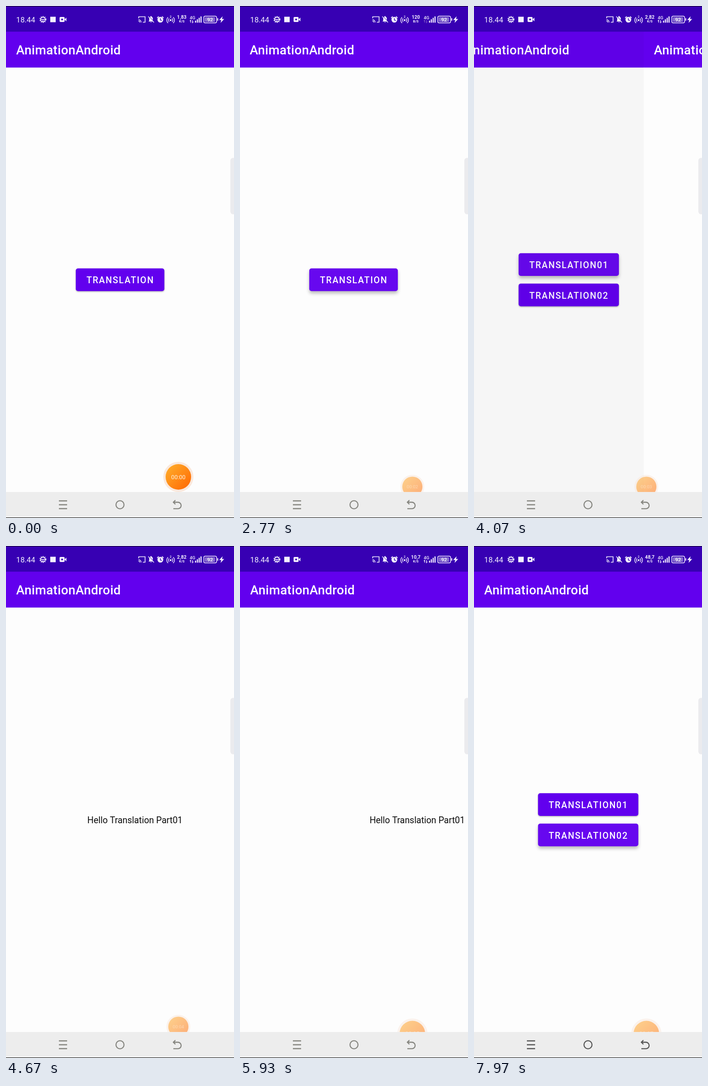
Animation, 500 px wide and 1121 px high, one loop 8 s. Source, as an HTML page with a canvas:

```html
<!DOCTYPE html>
<html lang="en">
<head>
<meta charset="utf-8">
<title>Translation demo</title>
<style>
  html, body { margin: 0; width: 100%; height: 100%; overflow: hidden; background: #000; }
  canvas { display: block; width: 500px; height: 1121px; }
</style>
</head>
<body>
<canvas id="stage" width="500" height="1121"></canvas>
<script>
const ctx = document.getElementById('stage').getContext('2d');
const LOOP = 8000, WIDTH = 500, NAV_TOP = 1064;
const ICON = '#f4f0ff', PRIMARY = '#6200ee', PRIMARY_DARK = '#3700b3';

const progress = (t, from, to) => Math.min(1, Math.max(0, (t - from) / (to - from)));
const mix = (a, b, k) => a + (b - a) * k;
const smooth = k => (1 - Math.cos(Math.PI * k)) / 2;
const slide = (t, end) => 1 - Math.pow(1 - progress(t, end - 500, end), 3.45);

function rect(x, y, w, h, color, radius = 0) {
  ctx.fillStyle = color;
  ctx.beginPath();
  ctx.roundRect(x, y, w, h, radius);
  ctx.fill();
}

function disc(x, y, r, color) {
  ctx.fillStyle = color;
  ctx.beginPath();
  ctx.arc(x, y, r, 0, 7);
  ctx.fill();
}

function arc(x, y, r, width, color = ICON, from = 0, to = Math.PI * 2) {
  ctx.strokeStyle = color;
  ctx.lineWidth = width;
  ctx.beginPath();
  ctx.arc(x, y, r, from, to);
  ctx.stroke();
}

function text(str, x, y, size, color, weight = 400, align = 'left', spacing = 0) {
  ctx.font = `${weight} ${size}px Roboto, sans-serif`;
  ctx.letterSpacing = spacing + 'px';
  ctx.textAlign = align;
  ctx.fillStyle = color;
  ctx.fillText(str, x, y);
}

function stroke(d, width, color = ICON) {
  ctx.strokeStyle = color;
  ctx.lineWidth = width;
  ctx.stroke(new Path2D(d));
}

function fill(d, color = ICON) {
  ctx.fillStyle = color;
  ctx.fill(new Path2D(d));
}

function button(label, x, y, w, press) {
  ctx.save();
  ctx.shadowColor = `rgba(40,40,40,${mix(0.35, 0.3, press)})`;
  ctx.shadowBlur = mix(3, 7, press);
  ctx.shadowOffsetY = mix(1.5, 5, press);
  rect(x, y, w, 49.7, PRIMARY, 5);
  ctx.restore();
  if (press) rect(x, y, w, 49.7, `rgba(255,255,255,${0.03 * press})`, 5);
  text(label, x + 23.4, y + 32.8, 19.44, '#fff', 500, 'left', 1.736);
}

const screens = [
  t => button('TRANSLATION', 153, 574.5, 194.3, progress(t, 2470, 2700)),
  t => {
    const first = progress(t, 3730, 3930) * (t < 5000);
    button('TRANSLATION01', 140.4, 541.3, 220, first);
    button('TRANSLATION02', 140.4, 607.8, 220, progress(t, 7730, 7970));
  },
  t => {
    const shift = 138.9 * smooth(progress(t, 4060, 5945));
    text('Hello Translation Part01', 145.3 + shift, 607, 19.44, '#0c0c0c');
  }
];

function drawScreen(index, x, t, shade = 0) {
  ctx.save();
  ctx.translate(x, 0);
  rect(0, 134, WIDTH, 987, '#fdfdfd');
  rect(0, 56, WIDTH, 78.7, PRIMARY);
  text('AnimationAndroid', 22.3, 106.3, 27.78, '#fff', 500, 'left', 0.347);
  screens[index](t);
  if (shade) rect(0, 56, WIDTH, 1065, `rgba(0,0,0,${shade})`);
  ctx.restore();
}

// The upper screen covers the lower one, which trails at a third of the speed.
function drawPair(lower, upper, cover, t) {
  if (cover < 1) drawScreen(lower, -WIDTH * cover / 3, t, 0.1 * cover);
  if (cover > 0) drawScreen(upper, WIDTH * (1 - cover), t);
}

function drawTimer(t) {
  const shrink = smooth(progress(t, 1800, 2350));
  const tuck = smooth(progress(t, 5430, 5850));
  const scale = mix(mix(1, 0.79, shrink), 1, tuck);
  ctx.save();
  ctx.translate(378, mix(mix(1031, 1052.5, shrink), 1067.5, tuck));
  ctx.scale(scale, scale);
  ctx.globalAlpha = mix(1, 0.5, shrink);
  disc(0, 0, 33, '#fae8dc');
  const glow = ctx.createLinearGradient(-20, -20, 20, 20);
  glow.addColorStop(0, '#ffa626');
  glow.addColorStop(1, '#ff7008');
  disc(0, 0, 28, glow);
  const seconds = Math.max(0, Math.floor((t - 120) / 1000));
  text('00:0' + seconds, 0, 4.6, 12.6, '#fff4e4', 400, 'center');
  ctx.restore();
}

function drawNav(t) {
  rect(0, NAV_TOP, WIDTH, 56, '#ededed');
  const ripple = progress(t, 6870, 7000) * (1 - progress(t, 7270, 7570));
  if (ripple) rect(300, NAV_TOP, 150, 55, `rgba(0,0,0,${0.07 * ripple})`, 27);
  const color = t < 6870 ? '#85857f' : '#555555';
  stroke('M116 1083.5H134M116 1092H134M116 1100.5H134', 2.3, color);
  arc(250, 1092, 8.8, 2.3, color);
  stroke('M371.5 1082L367 1086.5L371.5 1091M367 1086.5H377A7.1 7.1 0 0 1 377 1100.7H367', 2.3, color);
}

function drawStatus(t) {
  rect(0, 0, WIDTH, 56.3, PRIMARY_DARK);
  rect(0, 0, WIDTH, 1, '#080014');

  text('18.44', 22.3, 35.6, 16.6, ICON);
  arc(81, 29.5, 5, 1.8);
  ctx.setLineDash([2, 2.4]);
  arc(81, 29.5, 6.7, 1.8);
  ctx.setLineDash([]);
  stroke('M76 29.5H86M81 29.5V34', 1.4);
  rect(97, 23.5, 12, 12, ICON);
  rect(117.5, 24, 11, 11, ICON, 2);
  fill('M128 29.5L132.5 25.5V33.5Z');
  disc(123, 29.5, 2, PRIMARY_DARK);

  // cast, muted bell, alarm clock
  stroke('M291 27V23.5H305V35.5H300', 1.6);
  stroke('M290.5 30A6 6 0 0 1 296.5 36M290.5 33A3 3 0 0 1 293.5 36', 1.5);
  fill('M312.5 34L314 32V28Q314 24 317 23.4V22H319V23.4Q322 24 322 28V32L323.5 34ZM316.5 35H319.5Q318 37.5 316.5 35Z');
  stroke('M312 23L324.5 36', 1.5);
  stroke('M313 22L325.5 35', 1, PRIMARY_DARK);
  disc(338.5, 30, 6.3, ICON);
  stroke('M331.5 26L335 22.8M342 22.8L345.5 26', 1.8);
  stroke('M338.5 26.5V30.5L341.5 32', 1.4, PRIMARY_DARK);

  // hotspot
  disc(361, 31, 2, ICON);
  for (const r of [4.8, 8.5]) {
    arc(361, 31, r, 1.5, ICON, -0.85, 0.85);
    arc(361, 31, r, 1.5, ICON, Math.PI - 0.85, Math.PI + 0.85);
  }
  text('2', 361, 25.5, 7, ICON, 500, 'center');

  const speeds = ['1,83', '120', '2,82', '10,7', '48,7'];
  const step = Math.floor((t + 870) / 2000);
  text(speeds[step], 385.5, 27.5, 10.6, ICON, 700, 'center');
  text(step === 1 ? 'B/S' : 'K/S', 385.5, 35.8, 7.4, ICON, 700, 'center');

  text('4G', 403, 28.8, 9.6, ICON, 500);
  const arrows = t >= 870 && t < 3130 ? '#7a50c4' : ICON;
  stroke('M405 36.5V31L403.3 33M409 31V36.5L410.7 34.5', 1.3, arrows);
  for (let i = 0; i < 4; i++) {
    const height = 4.5 + 3.1 * i;
    rect(414.5 + 4 * i, 36.5 - height, 2.4, height, ICON, 0.6);
  }

  stroke('M436.8 22.3H458.8Q461.8 22.3 461.8 25.3V33.9Q461.8 36.9 458.8 36.9H436.8Q433.8 36.9 433.8 33.9V25.3Q433.8 22.3 436.8 22.3Z', 1.5);
  rect(436, 24.5, 22.5, 10.2, '#8a70d0', 1.5);
  rect(463.3, 26.5, 2, 6, ICON, 1);
  text('92', 447.5, 33.5, 11, '#fff', 500, 'center');
  fill('M475 22.5L467.5 30.8H472L470.5 37L478.5 28.4H473.8Z');
}

function draw(t) {
  ctx.clearRect(0, 0, WIDTH, 1121);
  if (t < 3500) drawPair(0, 1, slide(t, 3270), t);
  else drawPair(1, 2, slide(t, 4530) - slide(t, 7570), t);
  rect(492, 332.5, 12, 123.5, '#ebebee', 6);
  drawTimer(t);
  drawNav(t);
  drawStatus(t);
  rect(0, 1120, WIDTH, 1, '#000');
}

function tick() {
  draw(performance.now() % LOOP);
  requestAnimationFrame(tick);
}
tick();
</script>
</body>
</html>
```
